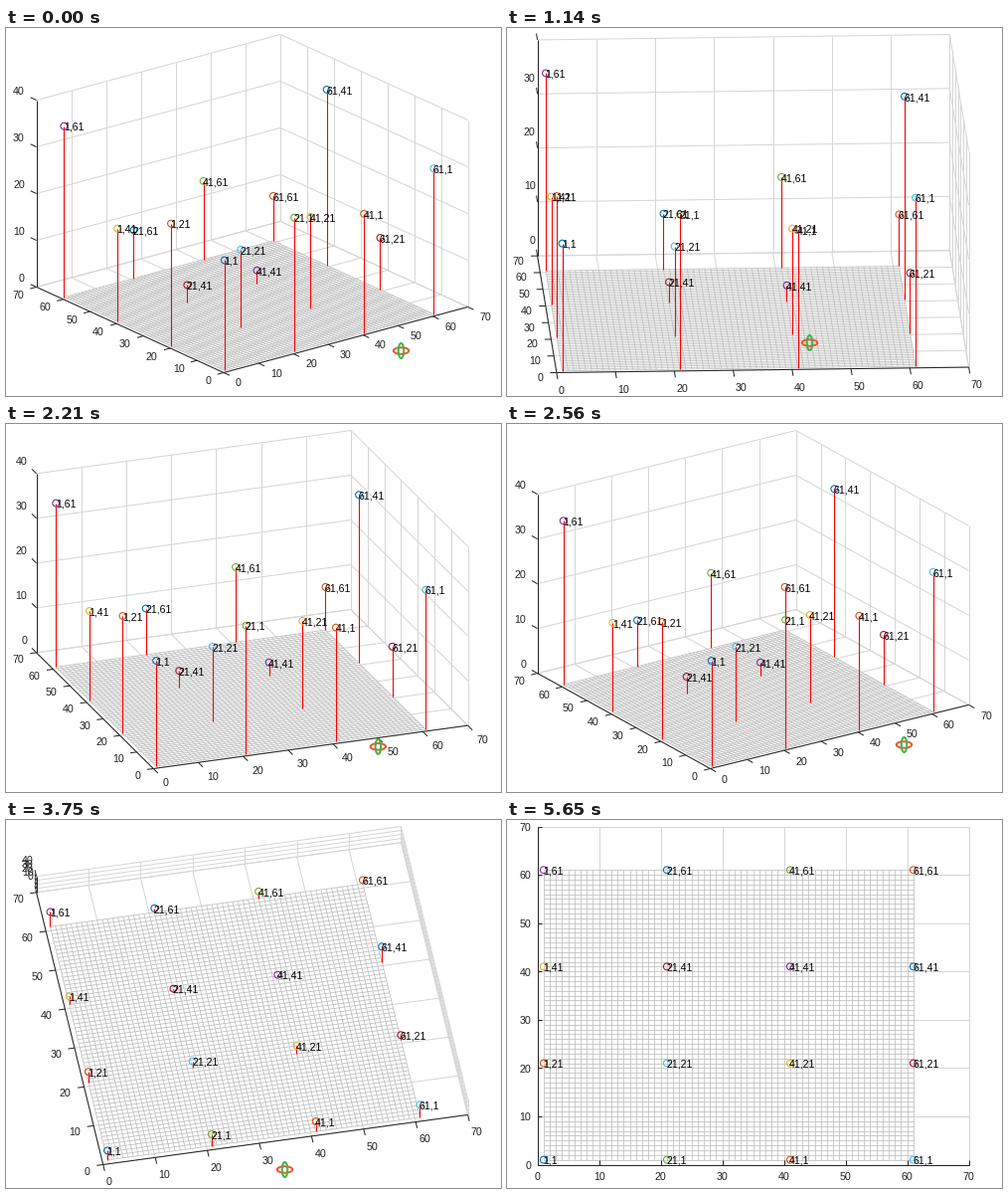
Recreate the animation shown at these times as a matplotlib script. Size 498 by 370 pixels, loop 6.58 s.

```python
import itertools

import numpy as np
import matplotlib.pyplot as plt
from matplotlib.animation import FuncAnimation
from matplotlib.collections import LineCollection
from matplotlib.patches import Ellipse, Polygon

W, H, DPI = 498, 370, 64
PX = 72 / DPI                      # one pixel in points
LOOP, STEP = 6580, 20
LEFT, RIGHT, TOP, BOTTOM = 30.6, 464.6, 6.5, 346.5
TURN = 180 / (RIGHT - LEFT)        # degrees per dragged pixel
TILT = 180 / (BOTTOM - TOP)
SIZE = np.array([70, 70, 40])

INK, GRID, MESH = "#222222", "#d6d6d6", "#c0c0c0"
CYCLE = ["#0072bd", "#d95319", "#edb120", "#7e2f8e",
         "#77ac30", "#4dbeee", "#a2142f"]

NODES = list(itertools.product((1, 21, 41, 61), repeat=2))
HEIGHTS = [23.6, 26.2, 19.9, 36.6, 28.7, 16.6, 3.8, 10.3,
           25.5, 19.6, 2.9, 16.8, 31.2, 11.1, 37.6, 9.6]

# pointer path: time, x, y
PATH = np.array([
    (60, 397, 324), (230, 404, 316), (600, 404, 316), (870, 368, 312),
    (1080, 320, 313), (1140, 304, 316), (1250, 275, 319), (1370, 259, 321),
    (1670, 259, 321), (1730, 267, 323), (1790, 284, 326), (2000, 335, 327),
    (2270, 385, 323), (2500, 395, 321), (2560, 399, 322), (2800, 399, 322),
    (3050, 349.4, 244), (3300, 330, 285), (3510, 308, 322), (3690, 289, 345),
    (3750, 280, 351), (3950, 267, 358), (4170, 259, 363), (4480, 259, 363),
    (4660, 264, 363)])

# spells in which the picture changes: begin, end, step
SPELLS = [(60, 230, 57), (600, 1250, 60), (1310, 1430, 60), (1670, 2270, 60),
          (2330, 2620, 57.5), (2800, 3450, 60), (3510, 4110, 60),
          (4170, 4230, 60), (4480, 4720, 60)]
LAG = 60
REGRAB, HIDE = 3050, 5650


def held(t):
    """Time of the latest redraw at or before t."""
    last = 0
    for begin, end, step in SPELLS:
        if t >= end:
            last = end
        elif t >= begin:
            last = begin + step * ((t - begin) // step)
    return last


def pointer(t):
    return (np.interp(t, PATH[:, 0], PATH[:, 1]),
            np.interp(t, PATH[:, 0], PATH[:, 2]))


def view(t):
    if t < REGRAB:
        x, y = pointer(np.clip(t, 600, 2560))
        return -37.5 + (404 - x) * TURN, 30 + (y - 316) * TILT
    x, y = pointer(t)
    return (264 - x) * TURN, min(90, 33.2 + (y - 244) * TILT)


def projector(az, el):
    """Map data points to pixels, stretching the cube to fill the box."""
    a, e = np.radians([az, el])
    basis = np.array([
        (np.cos(a), np.sin(a), 0),
        (-np.sin(e) * np.sin(a), np.sin(e) * np.cos(a), np.cos(e))]).T
    cube = np.array(list(itertools.product((0, 1), repeat=3))) @ basis
    lo, span = cube.min(0), np.ptp(cube, axis=0)

    def project(points):
        p = (np.asarray(points, float) / SIZE @ basis - lo) / span
        return np.stack([LEFT + (RIGHT - LEFT) * p[..., 0],
                         BOTTOM - (BOTTOM - TOP) * p[..., 1]], axis=-1)
    return project


X_TICKS = range(0, 71, 10)
Z_TICKS = range(0, 41, 10)


def grid_lines(back):
    lines = []
    for v in X_TICKS:
        lines += [[(v, 0, 0), (v, 70, 0)], [(0, v, 0), (70, v, 0)],
                  [(v, 70, 0), (v, 70, 40)], [(back, v, 0), (back, v, 40)]]
    for v in Z_TICKS:
        lines += [[(0, 70, v), (70, 70, v)], [(back, 0, v), (back, 70, v)]]
    return lines


MESH_LINES = [s for v in range(1, 62)
              for s in ([(v, 1, 0), (v, 61, 0)], [(1, v, 0), (61, v, 0)])]
SHEET = [(1, 1, 0), (61, 1, 0), (61, 61, 0), (1, 61, 0)]
STEMS = [[(x, y, 0), (x, y, z)] for (x, y), z in zip(NODES, HEIGHTS)]

fig = plt.figure(figsize=(W / DPI, H / DPI), dpi=DPI, facecolor="white")
ax = fig.add_axes([0, 0, 1, 1])
ax.set(xlim=(0, W), ylim=(H, 0))
ax.axis("off")


def add_lines(color, width, order):
    lines = LineCollection([], colors=color, linewidths=width * PX, zorder=order)
    return ax.add_collection(lines, autolim=False)


def add_text(label, order=5, color=INK):
    return ax.text(0, 0, label, family="Liberation Sans", size=10.6 * PX,
                   color=color, va="baseline", zorder=order)


def add_ring(w, h, color, order):
    return ax.add_patch(Ellipse((0, 0), w, h, fill=False, ec=color,
                                lw=2 * PX, zorder=order))


grid = add_lines(GRID, 1, 1)
sheet = ax.add_patch(Polygon([(0, 0)] * 4, fc="white", ec="none", zorder=2))
mesh = add_lines(MESH, 0.8, 2.1)
frame_lines = add_lines(INK, 1, 3)
stems = add_lines("#ff0000", 1.1, 4)
rings = ax.scatter(np.zeros(16), np.zeros(16), s=(6.8 * PX) ** 2,
                   facecolors="none", linewidths=1.1 * PX, zorder=6,
                   edgecolors=[CYCLE[i % 7] for i in range(16)])
names = [add_text(f"{x},{y}", 7, "black") for x, y in NODES]
x_names = [add_text(str(v)) for v in X_TICKS]
y_names = [add_text(str(v)) for v in X_TICKS]
z_names = [add_text(str(v)) for v in Z_TICKS]
cursor = [add_ring(15.5, 6.5, "#f0582f", 9), add_ring(5.5, 15, "#45b049", 10)]


def draw_axis(texts, spots, out, tick, reach, drop, align):
    """Place labels; return the axis line and its tick marks."""
    for text, spot in zip(texts, spots):
        x, y = spot + out * reach
        text.set(position=(x, y + drop), ha=align, visible=True)
    return [[spots[0], spots[-1]]] + [[s, s + out * tick] for s in spots]


def draw_axes(project, az, el):
    right = az > 0
    flat = el > 89.9
    side = 70 if right else 0
    xs = project([(v, 0, 0) for v in X_TICKS])
    ys = project([(side, v, 0) for v in X_TICKS])
    zs = project([(0, 0 if right else 70, v) for v in Z_TICKS])

    if flat and abs(az) < 0.01:
        down, west = np.array([0, 1]), np.array([-1, 0])
        lines = draw_axis(x_names, xs, down, -4.5, 7, 8.5, "center")
        lines += draw_axis(y_names, ys, west, -4.5, 6.5, 4.3, "right")
    else:
        x_dir, y_dir = np.array(project([[(1, 0, 0), (0, 1, 0)]]))[0] \
            - project((0, 0, 0))
        x_dir = x_dir / np.hypot(*x_dir)
        y_dir = y_dir / np.hypot(*y_dir)
        ends = ("right", "left") if right else ("left", "right")
        lines = draw_axis(x_names, xs, -y_dir, 6.5, 13, 8.3, ends[0])
        lines += draw_axis(y_names, ys, x_dir if right else -x_dir,
                           6.5, 13, 8.3, ends[1])
        if not flat:
            lines += draw_axis(z_names, zs, -x_dir if right else y_dir,
                               6.5, 13, 0.3, "right")
    if flat:
        for text in z_names:
            text.set_visible(False)
    frame_lines.set_segments(lines)


def update(i):
    t = i * STEP + STEP / 2
    now = held(t)
    az, el = view(now - LAG)
    project = projector(az, el)

    grid.set_segments(project(grid_lines(0 if az > 0 else 70)))
    sheet.set_xy(project(SHEET))
    mesh.set_segments(project(MESH_LINES))
    draw_axes(project, az, el)

    posts = project(STEMS)
    stems.set_segments(posts)
    rings.set_offsets(posts[:, 1])
    for name, (x, y) in zip(names, posts[:, 1]):
        name.set_position((x - 0.5, y + 4.3))

    x, y = pointer(now)
    for ring in cursor:
        ring.set(center=(x + 0.5, y + 0.5), visible=t < HIDE)
    return []


anim = FuncAnimation(fig, update, frames=LOOP // STEP, interval=STEP,
                     init_func=lambda: update(0), repeat=True, repeat_delay=0)
plt.show()
```
